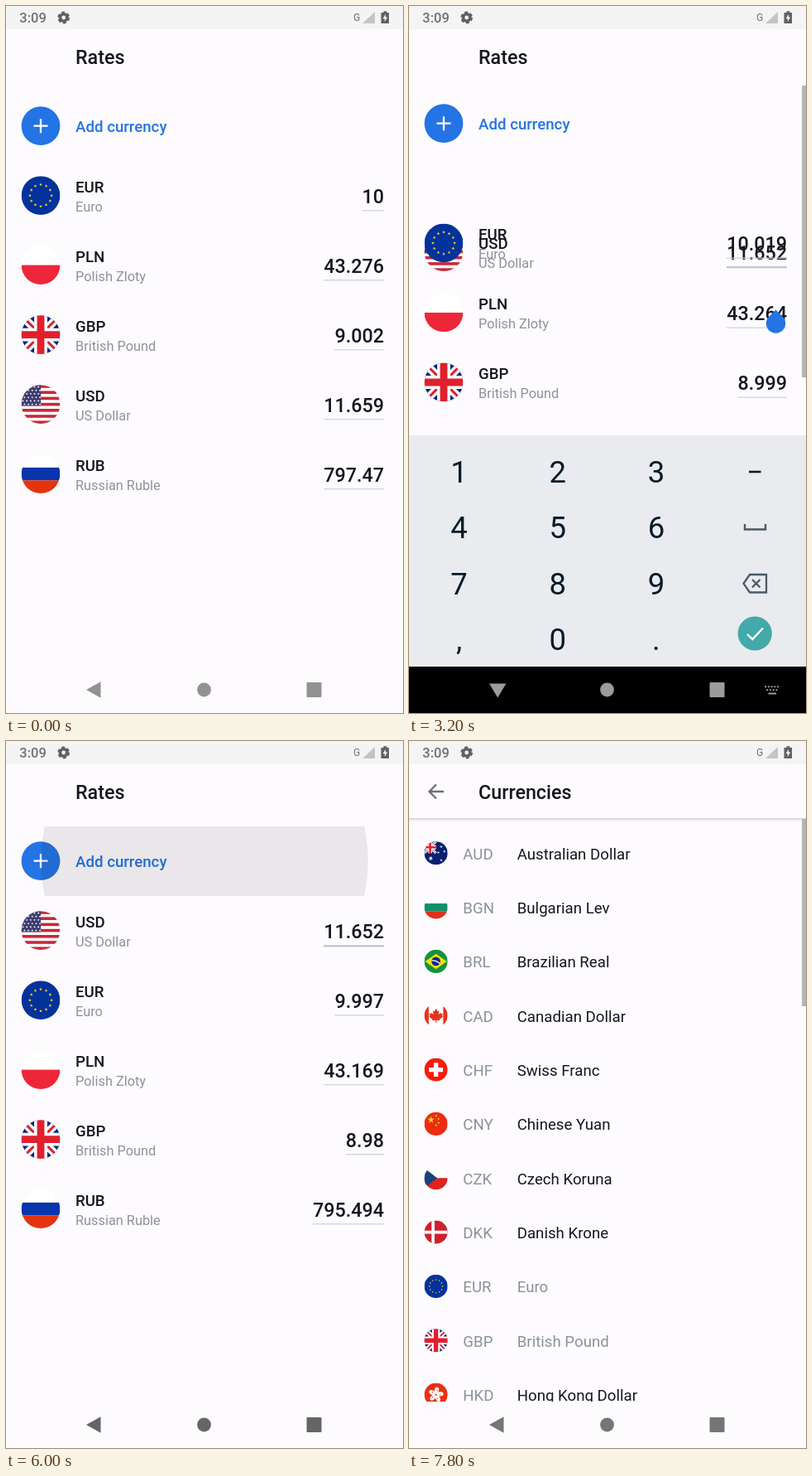
These frames come from a looping animation (480x853 px, 8000 ms). An HTML page:

```html
<!DOCTYPE html>
<html lang="en">
<head>
<meta charset="utf-8">
<title>Rates</title>
<style>
html, body { margin: 0; width: 100%; height: 100%; overflow: hidden; background: #fdfbfe; }
svg { display: block; width: 100vw; height: 100vh; font-family: Roboto, "Noto Sans", sans-serif; }
.title { font-size: 23.33px; font-weight: 500; fill: #16171b; }
.code { font-size: 18.67px; font-weight: 500; fill: #16171b; }
.name { font-size: 16.33px; fill: #8d9399; }
.item { font-size: 18.67px; fill: #16171b; }
.muted { fill: #8a9299; }
.key { font-size: 36.5px; fill: #061b28; text-anchor: middle; }
</style>
</head>
<body>
<svg id="stage" viewBox="0 0 480 853">
  <defs>
    <clipPath id="disc"><circle r="1"/></clipPath>
    <clipPath id="reveal"><rect id="revealRect" width="480" height="853"/></clipPath>
    <clipPath id="addRow"><rect y="103" width="480" height="84"/></clipPath>
    <linearGradient id="shade" x2="0" y2="1">
      <stop offset="0" stop-color="#000" stop-opacity=".17"/>
      <stop offset="1" stop-color="#000" stop-opacity="0"/>
    </linearGradient>
  </defs>
</svg>
<script>
const LOOP = 8000, BG = '#fdfbfe', BLUE = '#2474e5';
const stage = document.getElementById('stage');
const $ = id => document.getElementById(id);
const set = (id, attrs) => { for (const k in attrs) $(id).setAttribute(k, attrs[k]); };
const show = (id, on) => set(id, { visibility: on ? 'visible' : 'hidden' });
const clamp = v => Math.max(0, Math.min(1, v));
const ramp = (t, from, to) => clamp((t - from) / (to - from));
const smooth = p => (1 - Math.cos(Math.PI * p)) / 2;
const decelerate = p => 1 - (1 - p) ** 2;

function fastOutSlowIn(x) {
  let lo = 0, hi = 1, s = .5;
  for (let i = 0; i < 20; i++) {
    s = (lo + hi) / 2;
    const bx = 1.2 * (1 - s) ** 2 * s + .6 * (1 - s) * s * s + s ** 3;
    if (bx < x) lo = s; else hi = s;
  }
  return 3 * (1 - s) * s * s + s ** 3;
}

// Drawing helpers
const rect = (x, y, w, h, fill, more = '') =>
  `<rect x="${x}" y="${y}" width="${w}" height="${h}" fill="${fill}" ${more}/>`;
const circle = (x, y, r, fill, more = '') => `<circle cx="${x}" cy="${y}" r="${r}" fill="${fill}" ${more}/>`;
const path = (d, fill, more = '') => `<path d="${d}" fill="${fill}" ${more}/>`;
const line = (d, color, width, more = '') => path(d, 'none', `stroke="${color}" stroke-width="${width}" ${more}`);
const text = (x, y, cls, str, more = '') => `<text x="${x}" y="${y}" class="${cls}" ${more}>${str}</text>`;
const repeat = (n, fn) => Array.from({ length: n }, (_, i) => fn(i)).join('');

function star(x, y, r, fill, points = 5) {
  const pts = repeat(points * 2, i => {
    const a = Math.PI * i / points, q = i % 2 ? r * .42 : r;
    return `${(x + q * Math.sin(a)).toFixed(3)},${(y - q * Math.cos(a)).toFixed(3)} `;
  });
  return `<polygon points="${pts}" fill="${fill}"/>`;
}

// Flags, drawn in a square from -1 to 1
const fill = color => rect(-1, -1, 2, 2, color);
const cross = (color, w) => line('M-1 0H1M0-1V1', color, w);
const saltire = (color, w) => line('M-1-1L1 1M1-1L-1 1', color, w);
const unionJack = fill('#00247d') + saltire('#fff', .42) + saltire('#dc2030', .13)
  + cross('#fff', .68) + cross('#e0202e', .38);
const flags = {
  EUR: fill('#03329b') + repeat(12, i => {
    const a = Math.PI * i / 6;
    return star(.56 * Math.sin(a), -.56 * Math.cos(a), .085, '#ffd21a');
  }),
  PLN: fill('#fff') + rect(-1, 0, 2, 1, '#ed2739'),
  GBP: unionJack,
  USD: fill('#fff') + repeat(7, i => rect(-1, -1 + i * 4 / 13, 2, 2 / 13, '#c9283a'))
    + rect(-1, -1, 1, 14 / 13, '#3b3b6f')
    + repeat(30, i => star(-.92 + (i % 5) * .2 + (i / 5 & 1) * .08, -.9 + (i / 5 | 0) * .18, .065, '#fff')),
  RUB: fill('#fff') + rect(-1, -.33, 2, .66, '#0834ad') + rect(-1, .33, 2, .67, '#e4330f'),
  AUD: fill('#0a2070') + `<g transform="translate(-.5 -.5) scale(.5)">${unionJack}</g>`
    + star(-.45, .45, .2, '#fff', 7) + star(.45, -.55, .12, '#fff', 7) + star(.45, .6, .12, '#fff', 7)
    + star(.2, -.05, .12, '#fff', 7) + star(.72, -.15, .12, '#fff', 7),
  BGN: fill('#fff') + rect(-1, -.33, 2, .66, '#0f9069') + rect(-1, .33, 2, .67, '#e0301c'),
  BRL: fill('#12933f') + path('M-.92 0L0-.66L.92 0L0 .66Z', '#fddf0c') + circle(0, 0, .38, '#092b77')
    + line('M-.36-.08Q.05-.12.33.18', '#fff', .09),
  CAD: fill('#fff') + rect(-1, -1, .38, 2, '#e8331c') + rect(.62, -1, .38, 2, '#e8331c')
    + path('M0-.6L.13-.36L.27-.42L.21-.08L.39-.25L.44-.14L.6-.16L.52.04L.6.1L.3.32L.33.42L.04.38V.6H-.04V.38L-.33.42L-.3.32L-.6.1L-.52.04L-.6-.16L-.44-.14L-.39-.25L-.21-.08L-.27-.42L-.13-.36Z', '#e8331c'),
  CHF: fill('#f91b0b') + line('M-.6 0H.6M0-.6V.6', '#fff', .38),
  CNY: fill('#ec2c12') + star(-.42, -.35, .3, '#ffde1a') + star(.02, -.68, .11, '#ffde1a')
    + star(.22, -.42, .11, '#ffde1a') + star(.22, -.1, .11, '#ffde1a') + star(.02, .12, .11, '#ffde1a'),
  CZK: fill('#fff') + rect(-1, 0, 2, 1, '#dc2320') + path('M-1-.85L.1 0L-1 .85Z', '#17437c'),
  DKK: fill('#d0202f') + line('M-1 0H1M-.25-1V1', '#fff', .26),
  HKD: fill('#ea2f13') + repeat(5, i =>
    `<ellipse cx="0" cy="-.36" rx=".19" ry=".29" fill="#fff" transform="rotate(${i * 72 + 10})"/>`)
    + repeat(5, i => circle(.05, -.36, .05, '#ea2f13', `transform="rotate(${i * 72 + 10})"`)),
};
const flag = (code, x, y, r) =>
  `<g transform="translate(${x} ${y}) scale(${r})"><g clip-path="url(#disc)">${flags[code]}</g></g>`;

// Rates screen: list order after the move, `from` is the row before it
const rates = [
  { code: 'USD', name: 'US Dollar', from: 3, values: ['11.659', '11.594', '11.652', '11.652', '11.652'] },
  { code: 'EUR', name: 'Euro', from: 0, values: ['10', '10', '10', '10.019', '9.997'] },
  { code: 'PLN', name: 'Polish Zloty', from: 1, values: ['43.276', '43.035', '43.25', '43.264', '43.169'] },
  { code: 'GBP', name: 'British Pound', from: 2, values: ['9.002', '8.952', '8.997', '8.999', '8.98'] },
  { code: 'RUB', name: 'Russian Ruble', from: 4, values: ['797.47', '793.02', '796.991', '797.249', '795.494'] },
];
const updates = [270, 2000, 3040, 5200];
const textWidth = s => [...s].reduce((w, c) => w + (c === '.' ? 6.66 : 13.26), 0);
const base = rect(0, 0, 480, 853, BG) + rect(0, 0, 480, 28, '#f5f4f5');

const rateRow = ({ code, name }) => `<g id="${code}">${flag(code, 42, 0, 23.4)}
  ${text(84, -4, 'code', code)}${text(84, 19, 'name', name)}
  ${text(457, 9, 'title', '', `id="${code}Value" text-anchor="end"`)}
  ${rect(0, 17.6, 0, 1.2, '#cfd0d4', `id="${code}Line"`)}</g>`;

const ratesScreen = `<g id="rates">${base}${text(84, 70, 'title', 'Rates')}
  <g id="list">
    ${circle(42, 144.7, 23.4, BLUE)}${line('M33.5 144.7H50.5M42 136.2V153.2', '#fff', 2.3)}
    ${text(84, 152, 'code', 'Add currency', `style="fill:${BLUE}"`)}
    ${rates.map(rateRow).join('')}
    ${rect(443, 0, 2.4, 33, BLUE, 'id="cursor"')}
  </g>
  <g clip-path="url(#addRow)">${circle(240, 145, 0, '#000', 'id="ripple"')}</g>
  ${rect(475, 96, 5, 352, '#b5b4b7', 'id="scrollbar"')}
  ${rect(0, 0, 480, 853, '#000', 'id="dim"')}</g>`;

// Currency picker
const currencies = ['AUD Australian Dollar', 'BGN Bulgarian Lev', 'BRL Brazilian Real', 'CAD Canadian Dollar',
  'CHF Swiss Franc', 'CNY Chinese Yuan', 'CZK Czech Koruna', 'DKK Danish Krone', 'EUR Euro',
  'GBP British Pound', 'HKD Hong Kong Dollar'];
const pickerRow = (entry, i) => {
  const code = entry.slice(0, 3), y = 135.3 + i * 65.33, used = code in { EUR: 1, GBP: 1 };
  return flag(code, 32.6, y, 14.1) + text(65.3, y + 7.3, 'item muted', code)
    + text(130.7, y + 7.3, used ? 'item muted' : 'item', entry.slice(4));
};
const pickerScreen = `<g id="picker" clip-path="url(#reveal)">${base}
  ${text(84, 70, 'title', 'Currencies')}
  ${line('M42 61H25M33 52.5L24.5 61L33 69.5', '#707072', 2.3)}
  ${rect(0, 93, 480, 4, 'url(#shade)')}
  ${currencies.map(pickerRow).join('')}
  ${rect(475, 94, 5, 226, '#b5b4b7')}${rect(0, 797, 480, 56, BG)}</g>`;

// System bars and keyboard
const navShapes = circle(239.5, 825, 8.4) + rect(363.5, 816, 18, 18, '', 'rx="1"');
const nav = `<g id="nav">${path('M97 825L114.5 815.3V834.7Z')}${navShapes}</g>`
  .replace(/fill="(undefined)?"/g, '');
const darkNav = `<g fill="#9b9b9b">${path('M97 817.5H117.5L107.2 834.5Z')}${navShapes}</g>`
  .replace(/fill="(undefined)?"/g, '');
const status = text(16.3, 20.3, '', '3:09', 'font-size="16.5" font-weight="500" fill="#707072"')
  + circle(69.7, 14, 4.2, 'none', 'stroke="#5f6062" stroke-width="3.6"')
  + circle(69.7, 14, 6.3, 'none', 'stroke="#5f6062" stroke-width="2.2" stroke-dasharray="3.9 2.7"')
  + text(420, 18.3, '', 'G', 'font-size="12" fill="#707072"')
  + path('M446 7V21H431Z', '#c4c4c5')
  + path('M453.5 8H456.5V6.3H460.3V8H463V21H453.5Z', '#5f6062')
  + path('M459 10L455.5 15.3H457.8V19L461.2 13.6H459Z', '#f5f4f5');

const keys = ['1', '2', '3', '4', '5', '6', '7', '8', '9', ',', '0', '.'];
const keyboard = `<g id="keyboard">${rect(0, 518, 480, 280, '#e9ebee')}${rect(0, 797, 480, 70, '#000')}
  ${keys.map((k, i) => text(60.5 + (i % 3) * 119.2, 574.5 + (i / 3 | 0) * 67.5, 'key', k)).join('')}
  ${line('M411 562H425.5', '#061b28', 2.6)}
  ${line('M406 625V631.5H431V625', '#4b5963', 2.4)}
  ${line('M412 686H432V707.5H412L404.5 696.8ZM415 692L424.5 701.5M424.5 692L415 701.5', '#4b5963', 2.3)}
  ${circle(418.2, 757, 20.6, '#43a9aa')}${line('M409 758L415.3 764L428 750.5', '#fff', 2.3)}
  ${rect(50, 799, 115, 52, '#fff', 'rx="26" id="navRipple"')}${darkNav}
  ${line('M430 821.3H448M432 825.3H447', '#9b9b9b', 2, 'stroke-dasharray="2 1.8"')}
  ${line('M434.5 829.5H444', '#9b9b9b', 2)}</g>`;

const handle = path('M0-16.5L8.27-8.27A11.7 11.7 0 1 1-8.27-8.27Z', BLUE, 'id="handle"');
const touch = circle(0, 0, 11.5, '#d6d6d6', 'id="touch" fill-opacity=".8" stroke="#8e8e8e" stroke-opacity=".6" stroke-width="1.6"');

stage.insertAdjacentHTML('beforeend', ratesScreen + handle + pickerScreen + nav + status + keyboard + touch);

const taps = [
  { from: 2270, to: 2670, x: 437, y: 477 },
  { from: 4930, to: 5070, x: 109, y: 845.5 },
  { from: 5870, to: 6000, x: 240, y: 145 },
];
const moveAt = t => smooth(ramp(t, 3040, 3290));
const rowY = (from, to, p) => 228.6 + 84 * (from + (to - from) * p);

function drawRates(t) {
  const resized = t >= 3040 && t < 5270, scroll = resized ? -3 : 0;
  const version = updates.filter(u => t >= u).length;
  set('list', { transform: `translate(0 ${scroll})` });
  show('scrollbar', resized);

  rates.forEach(({ code, from, values }, i) => {
    const value = values[version], w = textWidth(value);
    set(code, { transform: `translate(0 ${rowY(from, i, moveAt(t))})` });
    if ($(code + 'Value').textContent !== value) $(code + 'Value').textContent = value;
    set(code + 'Line', { x: 457 - w, width: w });
  });
  const focus = ramp(t, 2270, 2530);
  set('USDLine', { height: 1.2 + focus, fill: focus ? '#bcc4cd' : '#cfd0d4' });

  const blink = t >= 2670 && t < 4990 && (t < 3170 || (t >= 3470 && t < 4000) || t >= 4470);
  set('cursor', { y: rowY(3, 0, moveAt(t)) - 19.6 });
  show('cursor', blink);
  show('handle', t >= 2670 && t < 5870);
  set('handle', { transform: `translate(443.5 ${rowY(3, 0, moveAt(t - 36)) + 31.4 + scroll})` });

  set('ripple', {
    r: 40 + 220 * decelerate(ramp(t, 5870, 6150)),
    opacity: t < 5870 ? 0 : .08 * (1 - ramp(t, 6070, 6400)),
  });
}

function drawKeyboard(t) {
  const shown = decelerate(ramp(t, 2860, 3080)), hidden = ramp(t, 5305, 5485);
  const level = shown * (1 - hidden);
  set('keyboard', { opacity: level, transform: `translate(0 ${72 * (t < 4000 ? 1 - shown : hidden)})` });
  show('keyboard', level > 0);
  set('navRipple', { opacity: .16 * ramp(t, 4930, 5070) * (1 - ramp(t, 5300, 5600)) });
}

function drawTransition(t) {
  const p = fastOutSlowIn(ramp(t, 6630, 7130));
  set('rates', { transform: `translate(0 ${-16.2 * p})` });
  set('dim', { opacity: .1 * ramp(t, 6650, 6870) });
  set('picker', { transform: `translate(0 ${35 * (1 - p)})` });
  set('revealRect', { y: 819 * (1 - p) });
  show('picker', t >= 6650);
  const grey = 146 - 45 * ramp(t, 5480, 5730) + 16 * ramp(t, 7600, 7800);
  set('nav', { fill: `rgb(${grey},${grey},${grey})` });
}

function draw(t) {
  drawRates(t);
  drawKeyboard(t);
  drawTransition(t);
  const tap = taps.find(p => t >= p.from && t < p.to);
  show('touch', !!tap);
  if (tap) set('touch', { cx: tap.x, cy: tap.y });
}

function frame() {
  draw(performance.now() % LOOP);
  requestAnimationFrame(frame);
}
frame();
</script>
</body>
</html>
```
